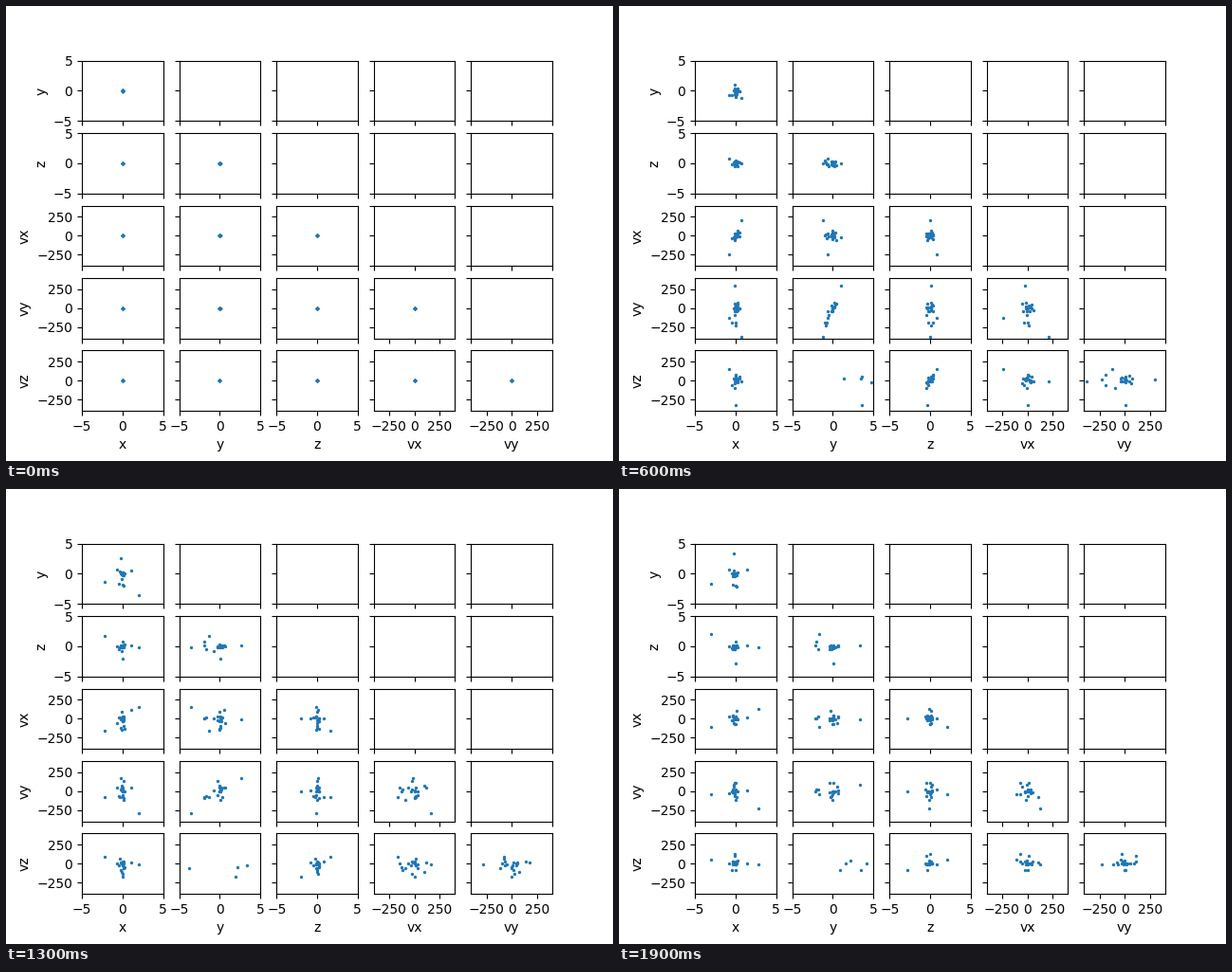
Animation of 640x480 px, one loop 2000 ms. Source, as a matplotlib script:

```python
import numpy as np
import matplotlib.pyplot as plt
from matplotlib.animation import FuncAnimation

NAMES = ["x", "y", "z", "vx", "vy", "vz"]
FRAMES, STEPS, COUNT = 20, 19, 22
DT = 0.001      # time per step
PULL = 22.0     # speed lost per step at unit radius
SOFT = 0.05
SLOW = 3        # bodies that are always about to turn round in y

# bodies thrown out of the centre: launch step and velocity
LAUNCHES = [
    (1, (0, -300, 125)),
    (1, (-15, -185, -180)),
    (2, (252, -448, -15)),
    (2, (-26, 384, 25)),
    (2, (22, -322, 30)),
    (4, (5, 4, -362)),
    (6, (262, 125, 40)),
    (6, (-190, 172, 0)),
]


def accel(pos):
    r2 = (pos ** 2).sum(axis=1, keepdims=True) + SOFT ** 2
    return -PULL * pos / r2 ** 0.7


def advance(pos, vel, sub=25):
    """Leapfrog all bodies by one step."""
    h = 1 / sub
    for _ in range(sub):
        vel = vel + accel(pos) * h / 2
        pos = pos + vel * DT * h
        vel = vel + accel(pos) * h / 2
    return pos, vel


def simulate():
    rng = np.random.default_rng(12)
    pos = rng.uniform(-0.025, 0.025, (COUNT, 3))
    vel = np.zeros((COUNT, 3))
    path = [np.hstack([pos, vel])]
    for step in range(1, STEPS):
        if step == 1:
            pos = rng.normal(0, 0.1, (COUNT, 3))
            vel = rng.normal(0, 110, (COUNT, 3))
        else:
            pos, vel = advance(pos, vel)
        for i, (start, speed) in enumerate(LAUNCHES):
            if step == start:
                pos[i], vel[i] = 0, speed
        state = np.hstack([pos, vel])
        n = len(LAUNCHES)
        slow = n + np.argsort(abs(state[n:, 4]))[:SLOW]
        state[slow, 4] = rng.uniform(-4.5, 4.5, SLOW)
        path.append(state)
    return path


def set_range(ax, axis, half, tick):
    ax.set(**{axis + "lim": (-half, half), axis + "ticks": (-tick, 0, tick)})


def span(index):
    return (400, 250) if index > 2 else (5, 5)


path = simulate()
fig, axes = plt.subplots(5, 5, figsize=(6.4, 4.8), dpi=100)
dots = []

for (row, col), ax in np.ndenumerate(axes):
    lower = col <= row
    set_range(ax, "x", *(span(col) if lower else (5, 5)))
    set_range(ax, "y", *(span(row + 1) if lower else (5, 5)))
    if lower:
        # the vz panel in the y column shows vy on its horizontal axis
        h = 4 if (row, col) == (4, 1) else col
        pair = [h, row + 1]
        dots.append((ax.scatter(*path[0][:, pair].T, s=2, c="C0"), pair))
    ax.label_outer()

for k in range(5):
    axes[4, k].set_xlabel(NAMES[k])
    axes[k, 0].set_ylabel(NAMES[k + 1])


def draw(frame):
    state = path[max(frame - 1, 0)]
    for dot, pair in dots:
        dot.set_offsets(state[:, pair])
    return [dot for dot, _ in dots]


anim = FuncAnimation(fig, draw, frames=FRAMES, interval=100,
                     repeat=True, repeat_delay=0)
plt.show()
```
